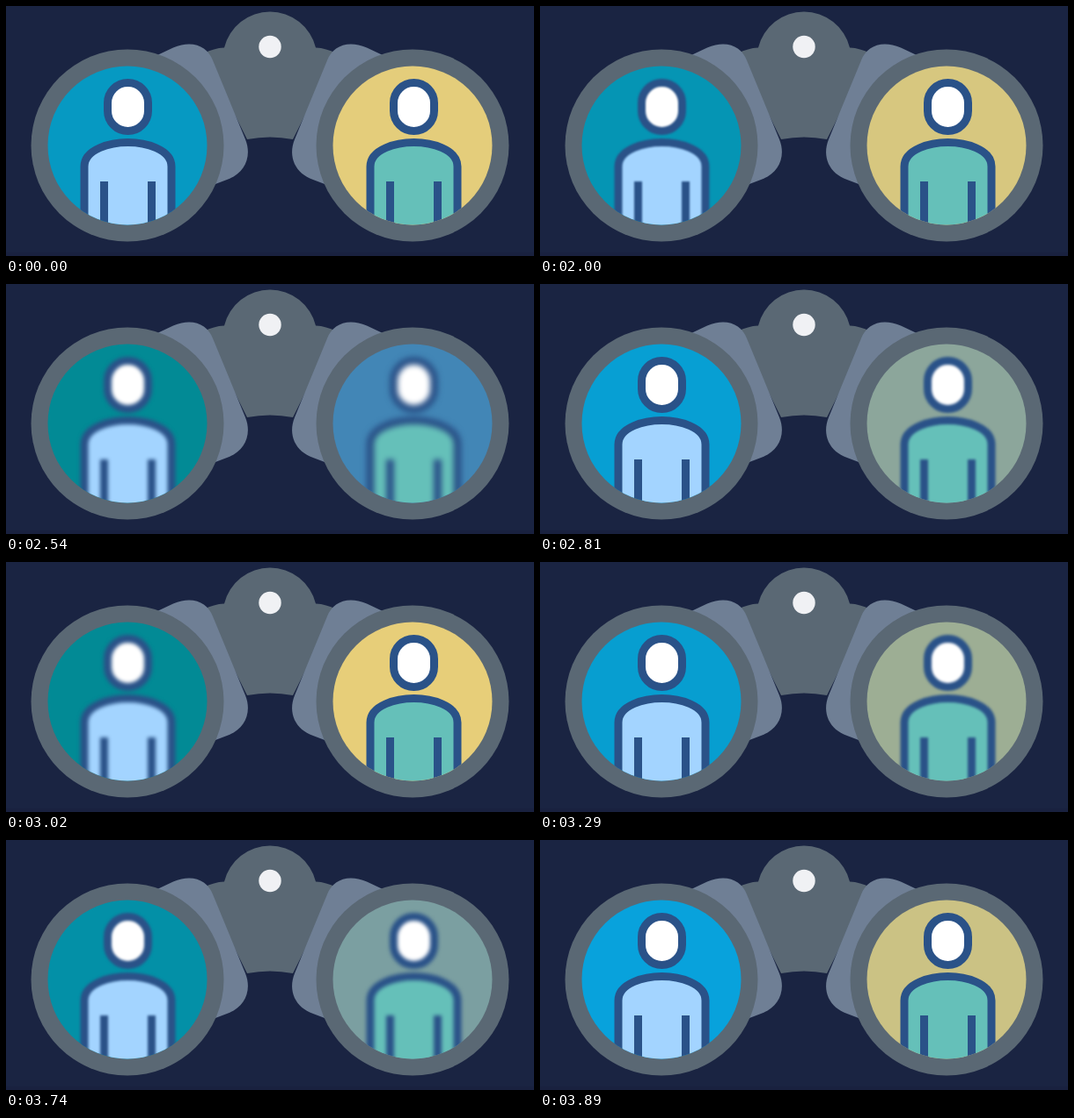
These frames come from a looping animation (600x285 px, 3920 ms). An HTML page:

```html
<!DOCTYPE html>
<html lang="en">
<head>
<meta charset="utf-8">
<title>Binoculars</title>
<style>
  html, body { margin: 0; width: 100%; height: 100%; overflow: hidden; background: #1a2442; }
  svg { display: block; width: 600px; height: 285px; }
</style>
</head>
<body>
<svg viewBox="0 0 600 285">
  <defs>
    <path id="arm" fill="#6f7f95" d="M172 56L190 47.5C212 38 229 46 235 62L272 152C280 172 271 191 251 198L230 206Z"/>
    <g id="person" stroke="#2a5288" stroke-width="9">
      <rect x="115.5" y="87.5" width="46" height="55" rx="23" fill="#fff"/>
      <path d="M89 300V183C89 163 119 155.5 138.5 155.5S188 163 188 183V300"/>
      <path d="M111.5 200V300M165.5 200V300"/>
    </g>
    <clipPath id="leftLens"><circle cx="138" cy="159" r="90.5"/></clipPath>
    <clipPath id="rightLens"><circle cx="462" cy="159" r="90.5"/></clipPath>
  </defs>
  <rect y="281" width="600" height="4" fill="#19213f"/>
  <path fill="#5a6874" d="M225 54Q236 48 248 47.500A53.500 53.500 0 0 1 352 47.500Q364 48 375 54L326 152Q300 147 274 152Z"/>
  <circle cx="300" cy="46.500" r="12.700" fill="#f0f1f4"/>
  <use href="#arm"/>
  <use href="#arm" transform="matrix(-1 0 0 1 600 0)"/>
  <g fill="#5a6874">
    <circle cx="138" cy="159" r="109.500"/>
    <circle cx="462" cy="159" r="109.500"/>
  </g>
  <circle id="leftGlass" cx="138" cy="159" r="90.500"/>
  <circle id="rightGlass" cx="462" cy="159" r="90.500"/>
  <g clip-path="url(#leftLens)">
    <g id="leftPerson"><use href="#person" fill="#a3d4ff"/></g>
  </g>
  <g clip-path="url(#rightLens)">
    <g id="rightPerson"><use href="#person" x="325" fill="#65c0b9"/></g>
  </g>
</svg>
<script>
const LOOP = 3920, HOLD = 2000, STEP = 30;
// Steps at which the left lens is alternately sharpest and most blurred.
const turns = [-3.3, 4.7, 12, 19.3, 26, 34.7, 47.5, 56.5, 64, 72];
const $ = id => document.getElementById(id);
const wave = turn => (1 + Math.cos(turn * Math.PI)) / 2;

function leftFocus(n) {
  let i = 0;
  while (n >= turns[i + 1]) i++;
  return wave(i + (n - turns[i]) / (turns[i + 1] - turns[i]));
}

const rightFocus = n => n ? wave((n - 36.5) / 16) : 0.96;

function show(side, focus, blurred, sharp, maxBlur) {
  const rgb = blurred.map((c, i) => Math.round(c + (sharp[i] - c) * focus));
  $(side + 'Glass').setAttribute('fill', `rgb(${rgb})`);
  $(side + 'Person').style.filter = `blur(${((1 - focus) * maxBlur).toFixed(2)}px)`;
}

function draw(now) {
  const t = now % LOOP;
  const n = t < HOLD ? 0 : 1 + Math.floor((t - HOLD) / STEP);
  show('left', leftFocus(n), [2, 138, 149], [8, 162, 220], 2);
  show('right', rightFocus(n), [62, 132, 183], [235, 208, 120], 3);
}

const start = performance.now();
function tick() {
  draw(performance.now() - start);
  requestAnimationFrame(tick);
}
tick();
</script>
</body>
</html>
```
